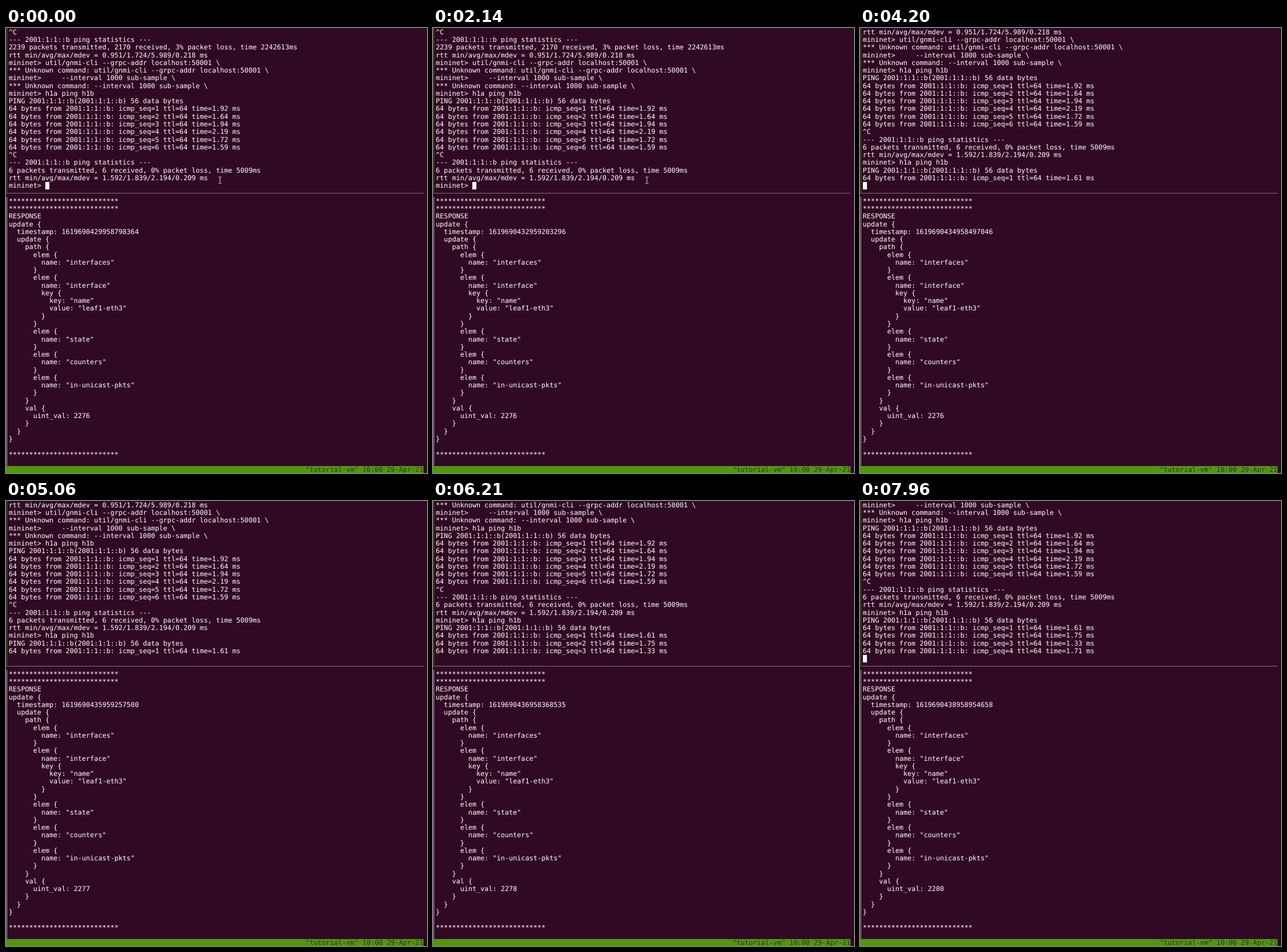
Write an HTML page that moves like this. It is 728 px wide and 769 px high and loops after 8000 ms.

```html
<!DOCTYPE html>
<html lang="en">
<head>
<meta charset="utf-8">
<title>Terminal: ping and counters</title>
<style>
  :root { --cw: 7.03px; --rh: 13.27px; --x0: 4.8px; --y0: 0.4px; }
  html, body { margin: 0; width: 100%; height: 100%; overflow: hidden; background: #300a24; }
  #stage { position: relative; width: 728px; height: 769px; overflow: hidden; background: #300a24; }
  #stage > * { position: absolute; }
  pre {
    margin: 0; left: var(--x0); color: #fff; white-space: pre;
    font: 11.68px/13.27px "DejaVu Sans Mono", "Noto Sans Mono", monospace;
    line-height: var(--rh);
    text-rendering: geometricPrecision;
    font-variant-ligatures: none;
  }
  #shell { top: 0.8px; }
  #stats { top: calc(0.8px + 22 * var(--rh)); }
  #cursor { top: 266px; width: 7px; height: 13px; background: #fff; }
  #split { left: 1px; top: 285px; width: 721px; height: 1px; background: #80756b; }
  .side { left: 1px; width: 1px; }
  #sideTop { top: 0; height: 285px; background: #4c6a1c; }
  #sideLow { top: 292px; height: 465px; background: #b5aab2; }
  #bar { left: 0; top: 757px; width: 722px; height: 12px; background: #4e9a06; }
  #clock { left: calc(var(--x0) + 73 * var(--cw)); top: calc(0.8px + 57 * var(--rh)); color: #2e3436; }
  #pointer { left: 366px; top: 256px; }
</style>
</head>
<body>
<div id="stage">
  <div id="sideTop" class="side"></div>
  <div id="sideLow" class="side"></div>
  <div id="split"></div>
  <div id="cursor"></div>
  <pre id="shell"></pre>
  <pre id="stats"></pre>
  <div id="bar"></div>
  <pre id="clock">"tutorial-vm" 10:00 29-Apr-21</pre>
  <svg id="pointer" width="8" height="14" viewBox="0 0 8 14" fill="none" stroke="#e4dce2">
    <path d="M1.5 1.5H3.2L4 2.3L4.8 1.5H6.5M4 2.3V11.7M1.5 12.5H3.2L4 11.7L4.8 12.5H6.5"/>
  </svg>
</div>
<script>
const LOOP = 8000, ROWS = 21, CELL = 7.03, LEFT = 4.8;
const $ = id => document.getElementById(id);

const PROMPT = 'mininet> ', PING = 'h1a ping h1b';
const HEADER = 'PING 2001:1:1::b(2001:1:1::b) 56 data bytes';
const SUMMARY = '--- 2001:1:1::b ping statistics ---';
const reply = (time, i) => `64 bytes from 2001:1:1::b: icmp_seq=${i + 1} ttl=64 time=${time} ms`;

const history = [
  '^C',
  SUMMARY,
  '2239 packets transmitted, 2170 received, 3% packet loss, time 2242613ms',
  'rtt min/avg/max/mdev = 0.951/1.724/5.989/0.218 ms',
  PROMPT + 'util/gnmi-cli --grpc-addr localhost:50001 \\',
  '*** Unknown command: util/gnmi-cli --grpc-addr localhost:50001 \\',
  PROMPT + '    --interval 1000 sub-sample \\',
  '*** Unknown command: --interval 1000 sub-sample \\',
  PROMPT + PING,
  HEADER,
  ...['1.92', '1.64', '1.94', '2.19', '1.72', '1.59'].map(reply),
  '^C',
  SUMMARY,
  '6 packets transmitted, 6 received, 0% packet loss, time 5009ms',
  'rtt min/avg/max/mdev = 1.592/1.839/2.194/0.209 ms'
];
const newReplies = ['1.61', '1.75', '1.33', '1.71'].map(reply);

const STARS = '*'.repeat(27);
const response = (stamp, count) => `${STARS}
${STARS}
RESPONSE
update {
  timestamp: 1619690${stamp}
  update {
    path {
      elem {
        name: "interfaces"
      }
      elem {
        name: "interface"
        key {
          key: "name"
          value: "leaf1-eth3"
        }
      }
      elem {
        name: "state"
      }
      elem {
        name: "counters"
      }
      elem {
        name: "in-unicast-pkts"
      }
    }
    val {
      uint_val: ${count}
    }
  }
}

${STARS}`;

// Each step: start in ms, then the values that change there.
const steps = [
  [0, { stamp: '429958798364', count: 2276, typed: '', replies: 0, cursor: true, pointer: true }],
  [120, { stamp: '430958641827' }],
  [1050, { stamp: '431959315742' }],
  [2140, { stamp: '432959203296' }],
  [2850, { pointer: false }],
  [2970, { typed: PING }],
  [3090, { stamp: '433959722431' }],
  [3460, { cursor: false }],
  [4080, { stamp: '434958497046', cursor: true }],
  [4200, { replies: 1 }],
  [4790, { cursor: false }],
  [5060, { stamp: '435959257500', count: 2277 }],
  [5310, { replies: 2 }],
  [5430, { cursor: true }],
  [6050, { stamp: '436958368535', count: 2278, cursor: false }],
  [6210, { replies: 3 }],
  [6640, { cursor: true }],
  [7040, { stamp: '437958723164', count: 2279 }],
  [7160, { replies: 4 }],
  [7280, { cursor: false }],
  [7840, { cursor: true }],
  [7960, { stamp: '438958954658', count: 2280 }]
];

const stateAt = t => Object.assign({}, ...steps.filter(s => s[0] <= t).map(s => s[1]));

function shellLines(s) {
  const lines = [...history, PROMPT + s.typed];
  if (s.replies) lines.push(HEADER, ...newReplies.slice(0, s.replies), '');
  return lines.slice(-ROWS);
}

function draw(t) {
  const s = stateAt(t), lines = shellLines(s);
  $('shell').textContent = lines.join('\n');
  $('stats').textContent = response(s.stamp, s.count);
  $('cursor').style.left = LEFT + CELL * lines[ROWS - 1].length + 'px';
  $('cursor').style.visibility = s.cursor ? 'visible' : 'hidden';
  $('pointer').style.visibility = s.pointer ? 'visible' : 'hidden';
}

const start = performance.now();
let shown = -1;
function tick() {
  const t = (performance.now() - start) % LOOP;
  const index = steps.filter(s => s[0] <= t).length;
  if (index !== shown) {
    shown = index;
    draw(t);
  }
  requestAnimationFrame(tick);
}
tick();
</script>
</body>
</html>
```
